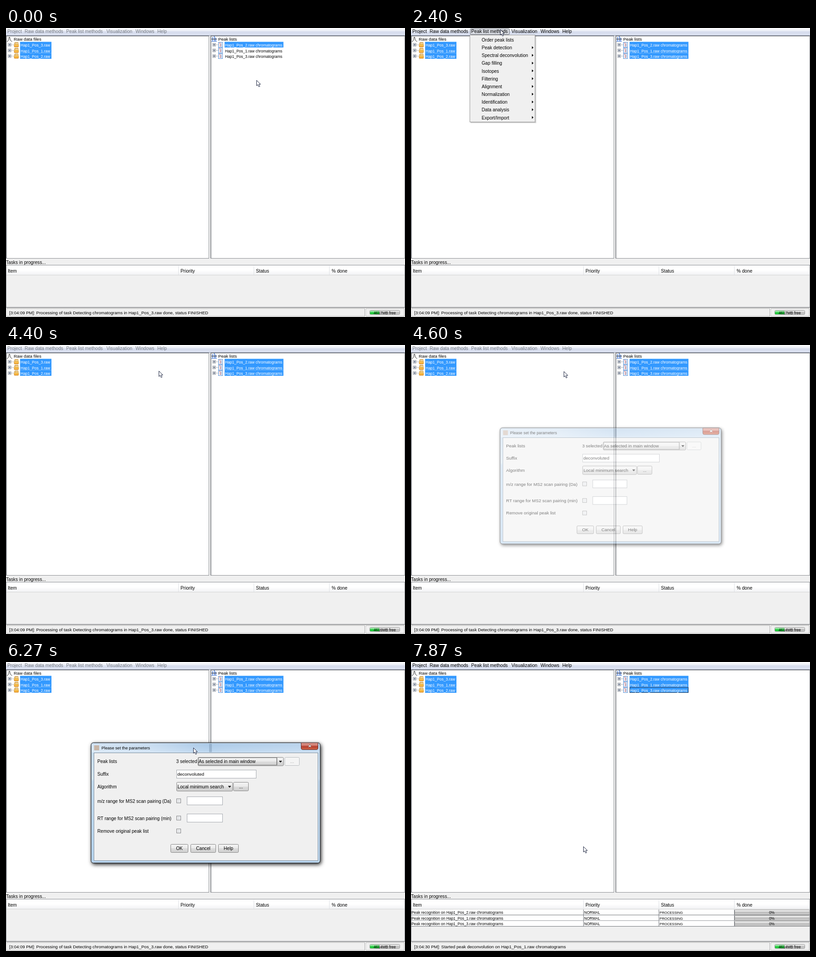
An HTML page for the animation above (8000 ms loop, 878 by 638 pixels).

```html
<!DOCTYPE html>
<html lang="en">
<head>
<meta charset="utf-8">
<title>Peak list processing</title>
<style>
  html, body { margin: 0; width: 100%; height: 100%; overflow: hidden; background: #f0f0f0; }
  svg { display: block; width: 878px; height: 638px; font-family: "Liberation Sans", Arial, sans-serif; }
  text { white-space: pre; }
  .shell { filter: drop-shadow(0 0 1px rgba(0,0,0,.6)) drop-shadow(2px 3px 4px rgba(0,0,0,.85)); }
</style>
</head>
<body>
<svg id="stage" viewBox="0 0 878 638" xmlns="http://www.w3.org/2000/svg">
  <defs>
    <linearGradient id="bar" x2="0" y2="1"><stop stop-color="#fff"/><stop offset=".45" stop-color="#e6eaf4"/><stop offset=".5" stop-color="#d5dbec"/><stop offset="1" stop-color="#dde3f2"/></linearGradient>
    <linearGradient id="btn" x2="0" y2="1"><stop stop-color="#f3f3f3"/><stop offset=".48" stop-color="#ebebeb"/><stop offset=".5" stop-color="#dddddd"/><stop offset="1" stop-color="#cfcfcf"/></linearGradient>
    <linearGradient id="hot" x2="0" y2="1"><stop stop-color="#eaf6fd"/><stop offset=".48" stop-color="#d9f0fc"/><stop offset=".5" stop-color="#bee6fd"/><stop offset="1" stop-color="#a7d9f5"/></linearGradient>
    <linearGradient id="head" x2="0" y2="1"><stop stop-color="#fff"/><stop offset=".5" stop-color="#fff"/><stop offset="1" stop-color="#f1f2f4"/></linearGradient>
    <linearGradient id="glass" x2="0" y2="1"><stop stop-color="#a9c8e6"/><stop offset=".08" stop-color="#bfd8f0"/><stop offset=".3" stop-color="#d3e5f7"/><stop offset=".32" stop-color="#b9d6f2"/><stop offset="1" stop-color="#abcdec"/></linearGradient>
    <linearGradient id="glow"><stop stop-color="#fff" stop-opacity=".45"/><stop offset=".25" stop-color="#fff" stop-opacity=".35"/><stop offset=".5" stop-color="#fff" stop-opacity="0"/><stop offset="1" stop-color="#fff" stop-opacity=".2"/></linearGradient>
    <linearGradient id="close" x2="0" y2="1"><stop stop-color="#dfa298"/><stop offset=".45" stop-color="#cb6d60"/><stop offset=".5" stop-color="#b33a2a"/><stop offset="1" stop-color="#d0694c"/></linearGradient>
    <linearGradient id="prog" x2="0" y2="1"><stop stop-color="#f4f4f4"/><stop offset=".4" stop-color="#d6d6d6"/><stop offset=".5" stop-color="#b9b9b9"/><stop offset="1" stop-color="#d2d2d2"/></linearGradient>
    <linearGradient id="green" x2="0" y2="1"><stop stop-color="#b6eebd"/><stop offset=".45" stop-color="#5fd971"/><stop offset=".5" stop-color="#0fc52c"/><stop offset="1" stop-color="#35d24d"/></linearGradient>
    <linearGradient id="folder" x2="0" y2="1"><stop stop-color="#ffd76a"/><stop offset="1" stop-color="#ee9a24"/></linearGradient>
    <linearGradient id="pick" x2="0" y2="1"><stop stop-color="#f1f5fb"/><stop offset="1" stop-color="#dfe9f6"/></linearGradient>
  </defs>
</svg>
<script>
const NS = "http://www.w3.org/2000/svg";
const stage = document.getElementById("stage");

function add(parent, tag, attrs = {}, content) {
  const node = document.createElementNS(NS, tag);
  for (const key in attrs) node.setAttribute(key, attrs[key]);
  if (content !== undefined) node.textContent = content;
  return parent.appendChild(node);
}
const group = (parent, attrs) => add(parent, "g", attrs);
const rect = (p, x, y, width, height, fill, more) => add(p, "rect", { x, y, width, height, fill, ...more });
const frame = (p, x, y, w, h, fill, stroke, rx = 0) => rect(p, x + .5, y + .5, w - 1, h - 1, fill, { stroke, rx });
const path = (p, d, stroke = "none", fill = "none", more) => add(p, "path", { d, stroke, fill, ...more });
const text = (p, x, y, size, content, fill = "#000", more) =>
  add(p, "text", { x, y, "font-size": size, fill, ...more }, content);
const show = (node, on) => node.setAttribute("display", on ? "inline" : "none");
const fade = (node, opacity) => node.setAttribute("opacity", opacity);

// Main window
rect(stage, 0, 0, 878, 638, "#f0f0f0");
rect(stage, 0, 0, 878, 16, "url(#bar)");
path(stage, "M0 16.5H878", "#8f98ac");
const menuButton = frame(stage, 130, 1, 87, 14, "#d6d9e0", "#6c7078", 2);
const menuTexts = [[3, "Project"], [41, "Raw data methods"], [132.5, "Peak list methods"],
  [221, "Visualization"], [285, "Windows"], [333, "Help"]]
  .map(([x, name]) => text(stage, x, 11, 10.2, name));

for (const [x, w] of [[0, 447], [450, 428]]) {
  frame(stage, x, 17, w, 492, "#fff", "#8a8d92");
  path(stage, `M${x + .75} 508V17.5H${x + w - 1}`, "#6b6e74", "none", { "stroke-width": 1.5 });
}

function expander(x, y) {
  path(stage, `M${x + 4} ${y}H${x + 9}`, "#8a8a8a", "none", { "stroke-dasharray": "1 1" });
  frame(stage, x - 3.5, y - 3.5, 7, 7, "#fff", "#848a94");
  path(stage, `M${x - 2} ${y}H${x + 2}M${x} ${y - 2}V${y + 2}`, "#2a3c5c");
}

path(stage, "M2 29.5C6 29 6 27 6.5 20.5H8.5C9 27 10 29 13.5 29.5", "#222", "#fff");
text(stage, 17, 28, 9.7, "Raw data files");
path(stage, "M454.5 20V29M458.5 18V29M461.5 21V29", "#2d63c8", "none", { "stroke-width": 1.4 });
path(stage, "M452 24.5H464", "#222");
path(stage, "M452 29.5H464", "#4d7fd6");
text(stage, 467, 28, 9.6, "Peak lists");

const ROW = 12.5, rowTop = i => 30.5 + ROW * i;
[3, 1, 2].forEach((n, i) => {
  const y = 37 + ROW * i;
  expander(8, y);
  rect(stage, 19, y - 5, 8, 5, "#e9b04a", { stroke: "#a9741c", "stroke-width": .7, rx: 1 });
  path(stage, `M20 ${y - 2.5}H27`, "#fff6d8", "none", { "stroke-width": 1.5 });
  rect(stage, 18, y - 1, 9.5, 6, "url(#folder)", { stroke: "#c47d14", "stroke-width": .7, rx: 1 });
  rect(stage, 31, rowTop(i), 69, ROW, "#3399ff");
  text(stage, 32, y + 4, 8.5, `Hap1_Pos_${n}.raw`, "#fff");
});

const lists = [2, 1, 3].map((n, i) => {
  const y = 37 + ROW * i;
  expander(458, y);
  frame(stage, 467, y - 6, 10, 12, "#f3f8ff", "#5b8fd0");
  path(stage, `M469 ${y - 3.5}H472M470 ${y - .5}H473M470 ${y + 2.5}H473`, "#d04545");
  path(stage, `M473.5 ${y - 4}V${y + 4}`, "#7b93b8");
  const back = rect(stage, 481, rowTop(i), 129.5, ROW, "#3399ff");
  const focus = rect(stage, 481.5, rowTop(i) + .5, 128.5, ROW - 1, "none", { stroke: i ? "#1d3350" : "#7a4a14" });
  const label = text(stage, 482, y + 4, 8.46, `Hap1_Pos_${n}.raw chromatograms`);
  return { back, focus, label };
});

// Task table
text(stage, 0, 520.5, 10.2, "Tasks in progress...");
frame(stage, 0, 523, 878, 94, "#f0f0f0", "#8a8d92");
rect(stage, 1, 524, 876, 21, "url(#head)");
path(stage, "M1 545.5H877", "#d5d5d5");
path(stage, "M379.5 525V545M545.5 525V545M711.5 525V545", "#dfe1e5");
[[4, "Item"], [384, "Priority"], [550, "Status"], [716.5, "% done"]]
  .forEach(([x, name]) => text(stage, x, 540, 10.2, name));

const tasks = group(stage);
[2, 1, 3].forEach((n, i) => {
  const y = 546.5 + ROW * i;
  rect(tasks, 1, y, 876, ROW, "#fff");
  path(tasks, `M1 ${y + 12}H877`, "#70747a");
  path(tasks, `M379.5 ${y}V${y + 12}M545.5 ${y}V${y + 12}M711.5 ${y}V${y + 12}`, "#70747a");
  text(tasks, 1, y + 9.5, 8.42, `Peak recognition on Hap1_Pos_${n}.raw chromatograms`);
  text(tasks, 381, y + 9.5, 8.2, "NORMAL");
  text(tasks, 547, y + 9.5, 7.7, "PROCESSING");
  rect(tasks, 712.5, y + .5, 164.5, 11, "url(#prog)", { stroke: "#9a9a9a", rx: 1.5 });
  text(tasks, 794, y + 9.5, 8.4, "0%", "#000", { "text-anchor": "middle" });
});

// Status bar
path(stage, "M0 617.5H878", "#a8a8a8");
for (const [x, w] of [[1, 789], [792, 85]]) {
  frame(stage, x, 619, w, 18, "#f0f0f0", "#b0b0b0");
  path(stage, `M${x + 1} 636V620.5H${x + w - 1}`, "#fbfbfb");
}
const status = text(stage, 7, 632, 9.57, "");
frame(stage, 800, 623, 67, 10, "url(#prog)", "#989898", 2);
rect(stage, 801, 624, 21, 8, "url(#green)", { rx: 1 });
const memory = text(stage, 809, 631.5, 8.5, "");

// Menus
function popup(x, y, w, h) {
  const g = group(stage);
  rect(g, x + 2, y + 2, w, h, "#000", { opacity: .18 });
  frame(g, x, y, w, h, "#f0f0f0", "#979797");
  return g;
}
const PITCH = 17.15;
const highlight = (g, x, y, w) => frame(g, x, y, w, 17, "url(#pick)", "#aecff7", 2);

const menu = popup(129, 15, 144.5, 193);
const menuPick = highlight(menu, 132, 35, 139);
["Order peak lists", "Peak detection", "Spectral deconvolution", "Gap filling", "Isotopes", "Filtering",
  "Alignment", "Normalization", "Identification", "Data analysis", "Export/Import"].forEach((name, i) => {
  const y = 26 + PITCH * i;
  text(menu, 155.5, y + 4, 10.1, name);
  if (i) path(menu, `M266 ${y - 3}L269.5 ${y}L266 ${y + 3}Z`, "none", "#000");
});

const submenu = popup(272, 34, 194, 71);
const subPick = highlight(submenu, 275, 53, 188);
["Smoothing", "Chromatogram deconvolution", "Peak extender", "Shape modeler"]
  .forEach((name, i) => text(submenu, 298, 48 + PITCH * i, 10.1, name));

// Parameter dialog
const dialog = group(stage);
const shell = group(dialog, { class: "shell" });
rect(shell, 187.5, 178.5, 503.5, 265, "url(#glass)", { stroke: "#1c2733", rx: 5 });
rect(dialog, 188.5, 179.5, 501.5, 263, "none", { stroke: "#eaf4fd", rx: 4, opacity: .8 });
rect(dialog, 189, 180, 500, 20, "url(#glow)", { rx: 3 });
rect(dialog, 447, 180, 6, 20, "#6f8aa6", { opacity: .4, rx: 2 });
rect(dialog, 192.5, 199.5, 495, 240, "none", { stroke: "#e3effa", opacity: .8 });
frame(dialog, 193, 200, 494, 239, "#f0f0f0", "#6d8499");
rect(dialog, 194, 184, 11, 11, "#c8b6a8");
text(dialog, 210, 193, 9.17, "Please set the parameters");
path(dialog, "M649.5 178.5H686.5V190Q686.5 193.5 683 193.5H653Q649.5 193.5 649.5 190Z", "#5c2a2a", "url(#close)");
for (const [color, width] of [["#6b3a36", 3], ["#fff", 1.6]])
  path(dialog, "M666 183.5L671 187.5M671 183.5L666 187.5", color, "none", { "stroke-width": width });

[[223, "Peak lists"], [251, "Suffix"], [278.5, "Algorithm"], [310.5, "m/z range for MS2 scan pairing (Da)"],
  [348.5, "RT range for MS2 scan pairing (min)"], [376.5, "Remove original peak list"]]
  .forEach(([y, name]) => text(dialog, 201, y, 10.1, name));
text(dialog, 374.5, 223, 10.1, "3 selected");

function button(x, y, w, h, label, lx = x + w / 2, anchor = "middle") {
  frame(dialog, x, y, w, h, "url(#btn)", "#858585", 2);
  const hot = frame(dialog, x, y, w, h, "url(#hot)", "#3c7fb1", 2);
  text(dialog, lx, y + h / 2 + 3.5, 10.2, label, "#000", { "text-anchor": anchor });
  fade(hot, 0);
  return hot;
}
const arrow = (x, y) => path(dialog, `M${x - 3.5} ${y - 2}H${x + 3.5}L${x} ${y + 2}Z`, "none", "#000");

const listHot = button(422, 210, 189, 19.5, "As selected in main window", 424, "start");
const listFocus = rect(dialog, 423.5, 211.5, 172, 16, "none", { stroke: "#333", "stroke-dasharray": "1 1" });
path(dialog, "M596.5 211V228", "#8a8a8a");
arrow(604, 220);
frame(dialog, 613, 210, 33, 19, "#f4f4f4", "#b8bcbf", 2);
text(dialog, 629.5, 223, 10, "...", "#9a9a9a", { "text-anchor": "middle" });
frame(dialog, 375, 238, 176, 19, "#fff", "#a4a8ae");
text(dialog, 377, 251, 9.95, "deconvoluted");
const algoHot = button(375, 265, 124, 20.5, "Local minimum search", 377.5, "start");
arrow(492, 275.5);
button(500, 265, 34, 20, "...");
for (const y of [306.5, 344.5, 373]) {
  frame(dialog, 375, y - 5, 10, 10, "#f6f6f6", "#7d7f82");
  rect(dialog, 377, y - 3, 6, 6, "#e4e6e9");
  if (y < 370) frame(dialog, 398, y - 9.5, 79, 19, "#fff", "#a4a8ae");
}
const okHot = button(362, 402, 39, 19, "OK");
button(406, 402, 56, 19, "Cancel");
button(467, 402, 45, 19, "Help");
const okFocus = rect(dialog, 365.5, 405.5, 32, 12, "none", { stroke: "#333", "stroke-dasharray": "1 1" });

const cursor = path(stage, "M.5 .5V12.5L3.2 10L5.3 14.8L7.5 13.9L5.5 9.2H9.2Z", "#1c2440", "#fff",
  { "stroke-linejoin": "round" });

// Pointer route: time, x, y
const route = [
  [0, 551, 115], [133, 549, 96], [333, 543, 39], [733, 543, 39], [1067, 541, 61], [1600, 541, 61],
  [1800, 490, 46], [2067, 290, 18], [2333, 196, 3], [2733, 196, 3],
  [2933, 200, 28], [3000, 204, 42], [3133, 246, 46], [3333, 326, 57], [3600, 326, 57], [4400, 336, 57],
  [4467, 336, 58], [4933, 336, 58], [5133, 338, 61], [5200, 338, 61], [5267, 339, 62],
  [5667, 358, 98], [6067, 384, 149], [6400, 430, 216], [6667, 436, 275], [6800, 418, 318],
  [6933, 399, 369], [7000, 396, 393], [7267, 382, 405], [7533, 379, 407], [8000, 379, 407]
];

function pointer(t) {
  const i = Math.max(1, route.findIndex(p => p[0] >= t));
  const [t0, x0, y0] = route[i - 1], [t1, x1, y1] = route[i];
  const f = (t - t0) / (t1 - t0);
  return [Math.round(x0 + (x1 - x0) * f), Math.round(y0 + (y1 - y0) * f)];
}

const LOOP = 8000, FPS = 15;

function render(ms) {
  // The screen refreshes fifteen times a second.
  const t = Math.floor(ms * FPS / 1000 + .06) * 1000 / FPS;
  const within = (a, b) => t >= a - 5 && t < b - 5;
  const after = a => within(a, Infinity);
  const [x, y] = pointer(Math.min(t, LOOP));
  cursor.setAttribute("transform", `translate(${x} ${y})`);

  const done = after(7867);
  const enabled = within(600, 3733) || done;
  menuTexts.forEach(m => m.setAttribute("fill", enabled ? "#000" : "#747981"));

  const all = after(1400);
  lists.forEach(({ back, focus, label }, i) => {
    const on = i === 0 || all;
    show(back, on);
    label.setAttribute("fill", on ? "#fff" : "#000");
    show(focus, i === 0 && within(600, 1400) || i === 2 && (within(1400, 2400) || done));
  });

  show(menuButton, within(2267, 3667));
  show(menu, within(2400, 3667));
  show(menuPick, after(3000));
  show(submenu, within(3200, 3667));
  show(subPick, after(3333));

  show(dialog, within(4533, 7867));
  const grow = Math.max(0, Math.min(1, (t - 4467) / 267));
  const scale = .93 + .07 * grow;
  fade(dialog, grow);
  dialog.setAttribute("transform", grow < 1 ? `translate(439 311) scale(${scale}) translate(-439 -311)` : "");
  fade(listHot, within(6400, 6467) ? 1 : within(6467, 6600) ? .5 : 0);
  fade(algoHot, within(6667, 6933) ? 1 : within(6933, 7133) ? .5 : 0);
  fade(okHot, within(7200, 7267) ? .5 : after(7267) ? 1 : 0);
  show(listFocus, !after(7667));
  show(okFocus, after(7667));

  show(tasks, done);
  status.textContent = done
    ? "[3:04:30 PM]: Started peak deconvolution on Hap1_Pos_1.raw chromatograms"
    : "[3:04:09 PM]: Processing of task Detecting chromatograms in Hap1_Pos_3.raw done, status FINISHED";
  memory.textContent = `${after(4467) ? 4614 : after(3467) ? 4616 : 4617}MB free`;
}

const start = performance.now();
function tick() {
  render((performance.now() - start) % LOOP);
  requestAnimationFrame(tick);
}
tick();
</script>
</body>
</html>
```
